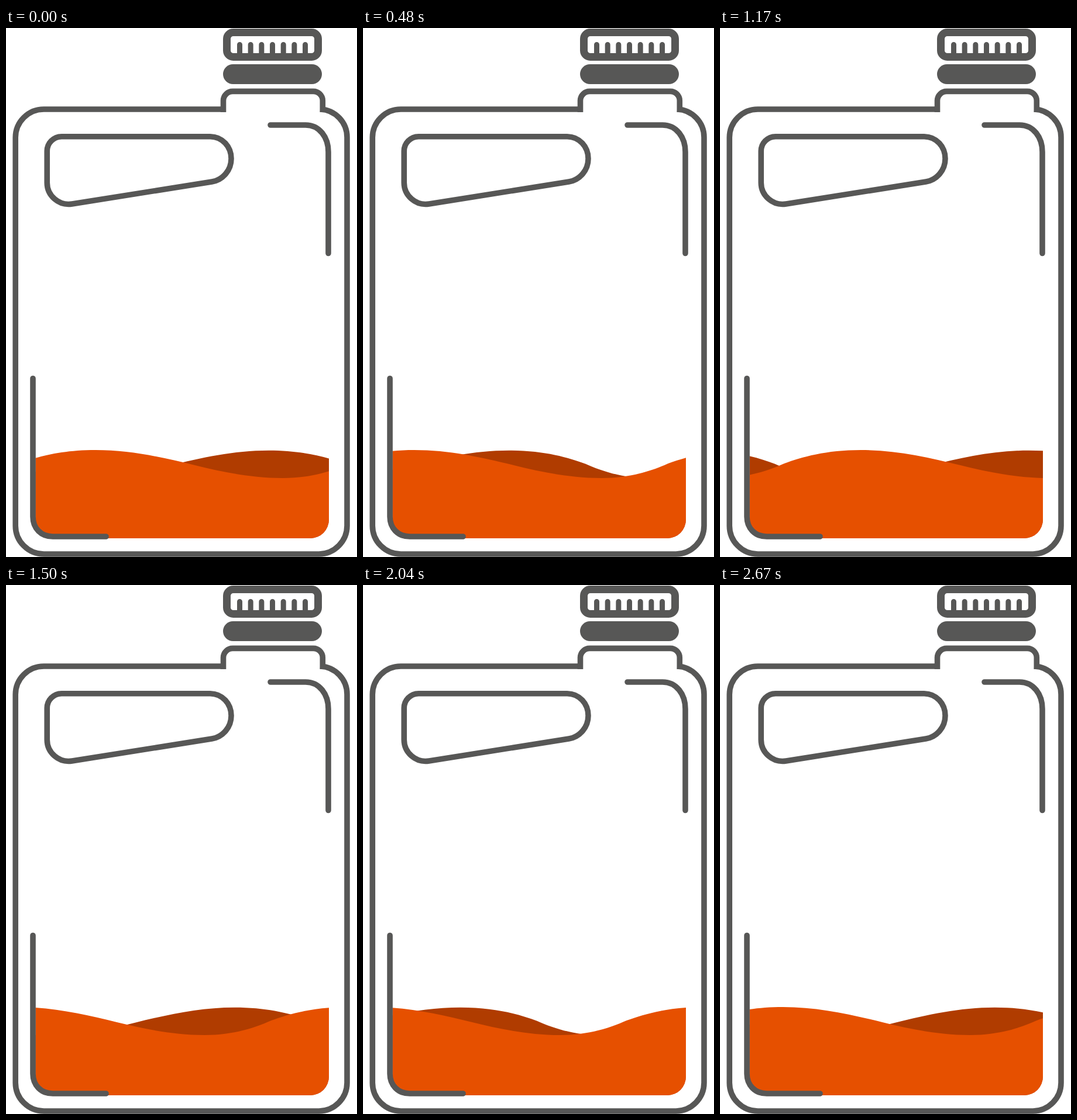
Animation, 600 px wide and 905 px high, one loop 2.7 s. Source, as an HTML page:

```html
<!DOCTYPE html>
<html lang="en">
<head>
<meta charset="utf-8">
<title>Canister</title>
<style>
  html, body { margin: 0; width: 100%; height: 100%; overflow: hidden; background: #fff; }
  svg { display: block; }
</style>
</head>
<body>
<svg width="600" height="905" viewBox="0 0 600 905">
  <clipPath id="tank">
    <path d="M50.5 700H552V841A32 32 0 0 1 520 873H82A32 32 0 0 1 50.5 841Z"/>
  </clipPath>
  <g clip-path="url(#tank)">
    <path id="back" fill="#b03c00"/>
    <path id="front" fill="#e65000"/>
  </g>
  <g fill="none" stroke="#575756" stroke-width="9.6">
    <!-- body and neck -->
    <path d="M376 139H65A48.5 48.5 0 0 0 16.2 187.500V851A48.500 48.500 0 0 0 65 900H535A48.500 48.500 0 0 0 583 851V187.500A48 48 0 0 0 537 139"/>
    <path d="M371.500 144V124A16 16 0 0 1 387.500 108.400H525A16 16 0 0 1 541.300 124V144"/>
    <!-- handle -->
    <path d="M95 185.700H349C370 186 385 203 385 223.500C385 243 371 260 352 263L113 301A37 37 0 0 1 70.200 264V211A25 25 0 0 1 95 185.700Z"/>
    <!-- highlights -->
    <g stroke-linecap="round">
      <path d="M452 166H512C536 166 551 187 551 212V385.500"/>
      <path d="M46 599.500V836C46 856 60 870 80 870H171"/>
    </g>
    <!-- cap -->
    <rect x="377.500" y="7.500" width="156" height="42" rx="11" stroke-width="13"/>
    <path id="ticks" stroke-width="9" stroke-linecap="round"/>
    <rect x="371" y="62" width="169" height="34" rx="17" fill="#575756" stroke="none"/>
  </g>
</svg>
<script>
  const LOOP = 2700, STEP = 30, PERIOD = 565;
  const [back, front, ticks] = ['back', 'front', 'ticks'].map(id => document.getElementById(id));

  ticks.setAttribute('d', Array.from({ length: 7 }, (_, i) => `M${399.5 + i * 18.67} 28.500V46`).join(''));

  // One wave from crest to crest: long slope down, short slope up.
  const wave = 'c60 0 115 12.5 170 26c45 11 95 22 150 22c50 0 87 -13 114 -25c30 -11 71 -23 131 -23';
  for (const path of [back, front]) path.setAttribute('d', `M${-PERIOD} 0${wave}${wave}V160H${-PERIOD}Z`);

  const wrap = x => ((x % PERIOD) + PERIOD) % PERIOD;

  function draw() {
    const t = Math.floor((performance.now() % LOOP) / STEP) * STEP;
    front.setAttribute('transform', `translate(${wrap(153 + 1.041 * t)} 722)`);
    back.setAttribute('transform', `translate(${wrap(449 - 0.4155 * t)} 722.7) scale(-1 1)`);
    requestAnimationFrame(draw);
  }
  draw();
</script>
</body>
</html>
```
